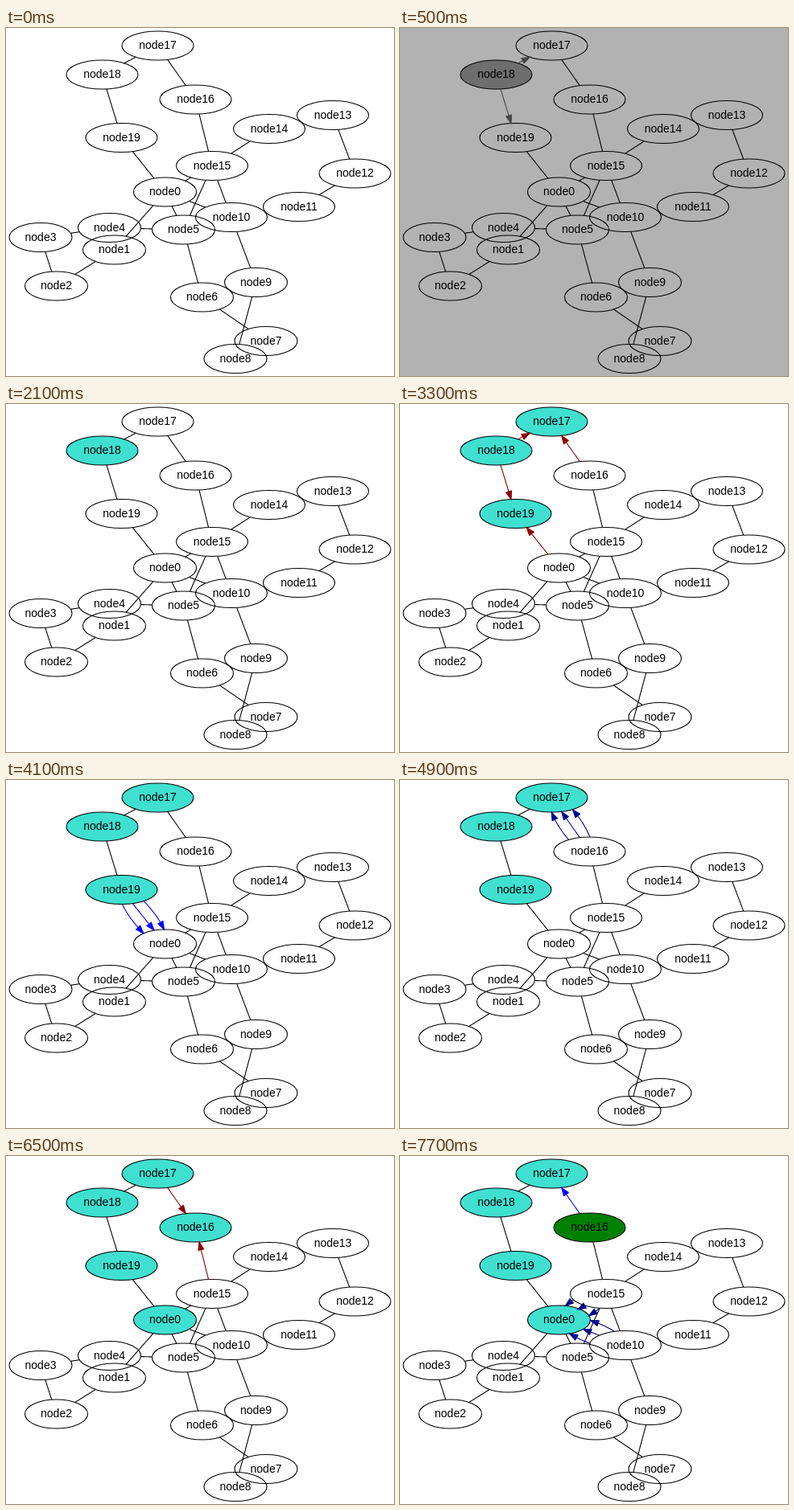
An HTML page with a canvas that plays this animation: 482x433 px, repeating every 8 s.

```html
<!DOCTYPE html>
<html lang="en">
<head>
<meta charset="utf-8">
<title>Node graph</title>
<style>
  html, body { margin: 0; width: 482px; height: 433px; overflow: hidden; background: #fff; }
  canvas { display: block; }
</style>
</head>
<body>
<canvas id="stage" width="482" height="433"></canvas>
<script>
const ctx = document.getElementById('stage').getContext('2d');
const LOOP = 8000, GAP = 18, HEAD = 10, STEPS = 400;
const TURQUOISE = '#40e0d0', GREEN = '#008000', RED = '#ff0000';
const ASK = '#0000ff', REPLY = '#00008b', JOIN = '#8b0000';

const nodes = [
  [197.5, 204], [134.5, 276], [62.5, 321], [43, 260.5], [128.5, 248.5],
  [220.5, 251], [243.5, 335], [323, 389.5], [285, 411.5], [310.5, 316.5],
  [280, 235.5], [364, 222.5], [433.5, 181], [406, 108.5], [327, 125.5],
  [256, 171.5], [235.5, 89], [188.5, 22], [119.5, 58], [143.5, 136.5]
].map(([x, y], i) => ({ x, y, rx: i < 10 ? 39 : 44.5, ry: 18 }));

const edges = [
  [0, 1], [1, 2], [2, 3], [3, 4], [4, 5], [0, 5], [5, 6], [6, 7], [8, 9],
  [9, 10], [11, 12], [12, 13], [14, 15], [15, 16], [16, 17], [17, 18],
  [18, 19], [19, 0], [0, 15], [0, 10], [5, 15], [10, 15]
];

// A bundle is [from, to, colours of its arrows].
const one = (a, b, c) => [a, b, [c]];
const three = (a, b, c) => [a, b, [c, c, c]];
const result = (a, b, lost) => [a, b, [0, 1, 2, 3].map(i => i === lost ? RED : GREEN)];
const join = (to, ...from) => from.map(n => one(n, to, JOIN));
const paint = (color, ...ids) => Object.fromEntries(ids.map(n => [n, color]));

const first = paint(TURQUOISE, 18);
const second = paint(TURQUOISE, 17, 18, 19);
const third = { ...second, ...paint(TURQUOISE, 0) };
const fourth = { ...third, ...paint(TURQUOISE, 16) };
const last = { ...third, ...paint(GREEN, 16) };

// [start time, node fills, arrow bundles, background]
const scenes = [
  [0, {}, []],
  [500, paint('#6e6e6e', 18), [one(18, 17, '#464646'), one(18, 19, '#464646')], '#b2b2b2'],
  [900, first, join(18, 17, 19)],
  [1300, first, [three(18, 17, ASK), three(18, 19, ASK)]],
  [1700, first, [three(17, 18, REPLY), three(19, 18, REPLY)]],
  [2100, first, []],
  [2900, first, [result(18, 17), result(18, 19)]],
  [3300, second, [...join(17, 18, 16), ...join(19, 18, 0)]],
  [3700, second, []],
  [4100, second, [three(19, 0, ASK)]],
  [4500, second, [three(0, 19, REPLY), three(17, 16, ASK)]],
  [4900, second, [three(16, 17, REPLY)]],
  [5300, second, []],
  [5700, second, [result(19, 0, 1)]],
  [6100, third, [...join(0, 19, 15, 10, 5, 1), result(17, 16)]],
  [6500, fourth, join(16, 17, 15)],
  [6900, fourth, [three(0, 1, ASK), three(0, 5, ASK)]],
  [7300, fourth, [three(1, 0, REPLY), three(5, 0, REPLY), three(0, 10, ASK), three(0, 15, ASK)]],
  [7700, last, [three(15, 0, REPLY), three(10, 0, REPLY), one(16, 17, ASK)]]
];

const inside = (p, n) => ((p.x - n.x) / n.rx) ** 2 + ((p.y - n.y) / n.ry) ** 2 < 1;

// Points of a bowed curve between two nodes, cut at their outlines.
function curve(a, b, bow) {
  const dx = b.x - a.x, dy = b.y - a.y, len = Math.hypot(dx, dy);
  const ox = -dy / len * bow, oy = dx / len * bow;
  const points = [];
  let left = false;
  for (let i = 0; i <= STEPS; i++) {
    const t = i / STEPS, s = t * t * (3 - 2 * t), w = 3 * t * (1 - t);
    const p = { x: a.x + dx * s + ox * w, y: a.y + dy * s + oy * w };
    if (!left && inside(p, a)) continue;
    left = true;
    points.push(p);
    if (inside(p, b)) break;
  }
  return points;
}

function line(points, color) {
  ctx.strokeStyle = color;
  ctx.beginPath();
  points.forEach(p => ctx.lineTo(p.x, p.y));
  ctx.stroke();
}

function arrow(a, b, bow, color) {
  const points = curve(a, b, bow);
  const tip = points[points.length - 1];
  let n = points.length - 1;
  while (n > 0 && Math.hypot(points[n].x - tip.x, points[n].y - tip.y) < HEAD) n--;
  line(points.slice(0, n + 1), color);
  const base = points[n];
  const len = Math.hypot(tip.x - base.x, tip.y - base.y) || 1;
  const ux = (tip.x - base.x) / len, uy = (tip.y - base.y) / len;
  const half = HEAD * 0.35;
  ctx.fillStyle = color;
  ctx.beginPath();
  ctx.moveTo(base.x - uy * half, base.y + ux * half);
  ctx.lineTo(base.x + ux * HEAD, base.y + uy * HEAD);
  ctx.lineTo(base.x + uy * half, base.y - ux * half);
  ctx.closePath();
  ctx.fill();
  ctx.stroke();
}

function drawNode(n, i, fill) {
  ctx.beginPath();
  ctx.ellipse(n.x, n.y, n.rx, n.ry, 0, 0, Math.PI * 2);
  if (fill) {
    ctx.fillStyle = fill;
    ctx.fill();
  }
  ctx.strokeStyle = '#000';
  ctx.stroke();
  ctx.fillStyle = '#000';
  ctx.fillText('node' + i, n.x, n.y + 4);
}

function draw([, fills, bundles, back = '#fff']) {
  ctx.fillStyle = back;
  ctx.fillRect(0, 0, 482, 433);
  ctx.lineWidth = 1.1;
  ctx.font = '14px "Liberation Sans", Arial, sans-serif';
  ctx.textAlign = 'center';
  nodes.forEach((n, i) => drawNode(n, i, fills[i]));
  const busy = ([a, b]) => bundles.some(([c, d]) => (a === c && b === d) || (a === d && b === c));
  for (const e of edges) {
    if (!busy(e)) line(curve(nodes[e[0]], nodes[e[1]], 0), '#000');
  }
  for (const [a, b, colors] of bundles) {
    colors.forEach((c, i) => arrow(nodes[a], nodes[b], GAP * ((colors.length - 1) / 2 - i), c));
  }
}

const start = performance.now();
function tick() {
  const t = (performance.now() - start) % LOOP;
  draw(scenes.filter(s => s[0] <= t).pop());
  requestAnimationFrame(tick);
}
tick();
</script>
</body>
</html>
```
